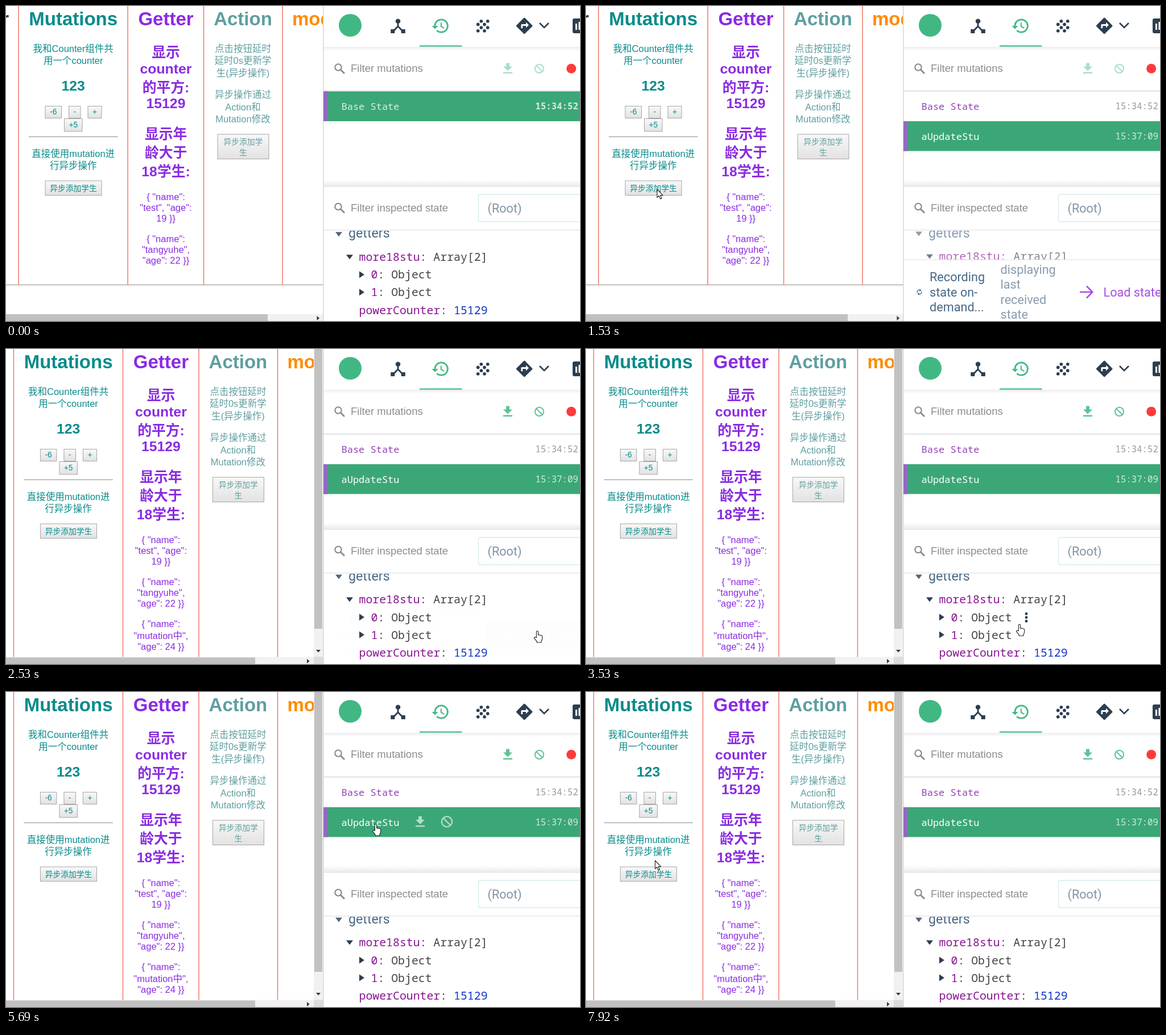
Write an HTML page that moves like this. It is 1009 by 555 pixels and loops after 8 s.

```html
<!DOCTYPE html>
<html lang="zh-CN">
<head>
<meta charset="utf-8">
<title>Store demo</title>
<style>
html, body { margin: 0; width: 100%; height: 100%; overflow: hidden; background: #fff; }
svg { display: block; width: 100vw; height: 100vh; }
text { white-space: pre; }
.page { font: 16.5px "Liberation Sans", "Noto Sans CJK SC", "Noto Sans CJK", sans-serif; text-anchor: middle; }
.page .h1 { font-size: 33px; font-weight: bold; }
.page .h2 { font-size: 24.75px; font-weight: bold; }
.page .btn text { font-size: 13.75px; }
.btn rect { fill: url(#face); stroke: #a6a6a6; }
.btn.down rect { fill: #dcdcdc; stroke: #888; }
.input { font: 18.56px "Liberation Sans", sans-serif; fill: #8c8c8c; }
.ui { font: 21.65px Roboto, sans-serif; }
.mono { font: 19.83px "Noto Sans Mono", monospace; fill: #444; }
.mono .key { fill: #881391; }
.mono .num { fill: #1034cc; }
.log { font: 17px "Noto Sans Mono", monospace; }
.time { font: 500 15.7px "Noto Sans Mono", monospace; }
.ink { fill: #2c3e50; }
.line { fill: none; stroke-width: 2.6; }
</style>
</head>
<body>
<svg viewBox="0 0 1009 555" preserveAspectRatio="none">
  <defs>
    <linearGradient id="face" x2="0" y2="1"><stop stop-color="#f8f8f8"/><stop offset="1" stop-color="#e2e2e2"/></linearGradient>
    <linearGradient id="above" x2="0" y2="1"><stop stop-color="#fff"/><stop offset="1" stop-color="#ececec"/></linearGradient>
    <linearGradient id="below" x2="0" y2="1"><stop stop-color="#ededed"/><stop offset="1" stop-color="#fff"/></linearGradient>
    <clipPath id="pageClip"><rect id="pageBox" width="558" height="543"/></clipPath>
    <clipPath id="treeClip"><rect x="559" y="396" width="450" height="159"/></clipPath>
    <g id="search"><circle cx="-2" cy="-2" r="5.7" fill="none" stroke="#888" stroke-width="2.1"/><path d="M2.5 2.5 9 9" stroke="#888" stroke-width="2.6"/></g>
    <path id="save" d="M-3-9h6v6h5L0 5-8-3h5zM-8 7H8v2.4H-8z"/>
    <g id="block" fill="none" stroke-width="2"><circle r="7.6"/><path d="M-5.4-5.4 5.4 5.4"/></g>
    <path id="open" d="M-6-3.5H6L0 4.5z"/>
    <path id="shut" d="M-4-6 5 0-4 6z"/>
  </defs>
  <rect width="1009" height="555" fill="#fff"/>

  <g clip-path="url(#pageClip)">
    <g id="page" class="page"></g>
  </g>
  <g id="barsShort">
    <rect y="543" width="558" height="12" fill="#f1f1f1"/><rect y="543" width="460" height="12" fill="#c1c1c1"/>
    <path d="M546.5 546v8l4.5-4z" fill="#333"/>
  </g>
  <g id="barsLong">
    <path d="M0 542.5H541V0H557V555H0z" fill="#f1f1f1"/>
    <path d="M0 543.5H438V555H0zM542 0H556V493H542z" fill="#c1c1c1"/>
    <rect x="541" y="542.5" width="16" height="13" fill="#dcdcdc"/>
    <path d="M529 546v8l4.5-4zM545 530h8l-4 4.5z" fill="#333"/>
  </g>

  <rect x="557" width="452" height="555" fill="#fff"/>
  <rect x="557.3" width="1.2" height="555" fill="#ccc"/>
  <rect x="559" y="72" width="450" height="7" fill="url(#below)"/>
  <circle cx="605" cy="34" r="20" fill="#41b883"/>
  <rect x="727" y="69" width="74.5" height="3" fill="#70caa6"/>
  <g class="ink">
    <path transform="translate(672 18.2) scale(1.42)" d="M17 16l-4-4V8.82A3 3 0 1 0 11 8.82V12l-4 4H3v5h5v-3.05l4-4.2 4 4.2V21h5v-5z"/>
    <path transform="translate(747 18.2) scale(1.4)" fill="#42b983" d="M13 3a9 9 0 0 0-9 9H1l3.89 3.89.07.14L9 12H6a7 7 0 1 1 7 7 6.97 6.97 0 0 1-4.94-2.06l-1.42 1.42A9 9 0 1 0 13 3zm-1 5v5l4.28 2.54.72-1.21-3.5-2.08V8z"/>
    <g id="grain" transform="translate(821.2 18.2) scale(1.42)"></g>
    <path transform="translate(894 17.8) scale(1.43)" d="M21.71 11.29l-9-9a1 1 0 0 0-1.42 0l-9 9a1 1 0 0 0 0 1.42l9 9a1 1 0 0 0 1.42 0l9-9a1 1 0 0 0 0-1.42zM14 14.5V12h-4v3H8v-4a1 1 0 0 1 1-1h5V7.5l3.5 3.5z"/>
    <rect x="996" y="22" width="26" height="26" rx="3"/>
    <path d="M1001 31h3v11h-3zM1006.5 28h3v14h-3z" fill="#fff"/>
  </g>
  <path class="line" d="M938 30l8 8 8-8" stroke="#2c3e50"/>

  <use href="#search" x="586" y="110"/>
  <text class="input" x="606" y="116">Filter mutations</text>
  <g id="tools" fill="#42b983" stroke="none">
    <use href="#save" x="882" y="109.5"/><use href="#block" x="937.5" y="110.3" stroke="#42b983"/>
  </g>
  <circle cx="993.7" cy="110.3" r="8.5" fill="#fd3b3b"/>
  <rect x="559" y="148.5" width="450" height="2.5" fill="#e6e6e8"/>
  <g id="active"><rect x="558" width="451" height="52.5" fill="#3ba776"/><rect x="558" width="8" height="52.5" fill="#9468c6"/></g>
  <text id="base" class="log" x="589.5" y="182.5" font-style="italic">Base State</text>
  <text id="baseTime" class="time" x="930.5" y="182">15:34:52</text>
  <g id="update">
    <text class="log" x="589.5" y="235.5" font-weight="bold" fill="#fff">aUpdateStu</text>
    <text class="time" x="930.5" y="235" fill="#d3ecdf" font-weight="bold">15:37:09</text>
  </g>
  <g id="rowTools" fill="#b4dcc9"><use href="#save" x="728" y="228"/><use href="#block" x="775" y="228.5" stroke="#b4dcc9" transform="translate(-155 -45.7) scale(1.2)"/></g>

  <rect x="559" y="306" width="450" height="11" fill="url(#above)"/>
  <rect x="559" y="317" width="450" height="1.5" fill="#e4e4e4"/>
  <use href="#search" x="586" y="355.5"/>
  <text class="input" x="606" y="361.5">Filter inspected state</text>
  <rect x="830.5" y="332" width="190" height="48" rx="3" fill="#fff" stroke="#d3eeeb" stroke-width="1.4"/>
  <text class="ui" x="846.5" y="363.5" fill="#8195a6">(Root)</text>
  <rect x="559" y="394" width="450" height="1.4" fill="#e3e5e8"/>

  <g clip-path="url(#treeClip)">
    <g id="tree" class="mono">
      <use href="#open" x="585" y="401" fill="#586676"/>
      <text class="ui" x="602" y="407.7" fill="#486887" style="font-size:23.2px">getters</text>
      <g class="ink"><use href="#open" x="604" y="441"/><use href="#shut" x="625" y="472.5"/><use href="#shut" x="625" y="503.5"/></g>
      <text x="620.5" y="448"><tspan class="key">more18stu</tspan>: Array[2]</text>
      <text x="641.5" y="479.5"><tspan class="key">0</tspan>: Object</text>
      <text x="641.5" y="510.5"><tspan class="key">1</tspan>: Object</text>
      <text x="620.5" y="542"><tspan class="key">powerCounter</tspan>: <tspan class="num">15129</tspan></text>
    </g>
    <g id="dots" class="ink"><circle cy="-6.5" r="2.4"/><circle r="2.4"/><circle cy="6.5" r="2.4"/></g>
  </g>

  <g id="notice" class="ui">
    <rect x="559" y="447" width="450" height="108" fill="#fff"/>
    <rect x="559" y="446.5" width="450" height="1.2" fill="#e3e5e8"/>
    <path d="M582.3 505a3.7 3.7 0 0 1 5.5-4.2M589.7 503a3.7 3.7 0 0 1-5.5 4.2" fill="none" stroke="#486887" stroke-width="1.3"/>
    <path d="M586.6 498.6l3.2 2.7-3.6 1.6zM585.4 509.4l-3.2-2.7 3.6-1.6z" fill="#486887"/>
    <g id="noticeText"></g>
    <rect id="load" x="845" y="478.5" width="180" height="50" rx="4" fill="#b977f8"/>
    <g id="loadText"><path class="line" d="M868 504H890M880 493.5 890.3 504 880 514.5"/><text x="909.5" y="511.5">Load state</text></g>
  </g>

  <g id="cursor" stroke-linejoin="round" fill="#fff" stroke="#222" stroke-width="1.1">
    <path id="arrow" d="M0 0V14.5l3.3-3.1 2.4 5.6 2.3-1-2.4-5.4h4.6z"/>
    <path id="hand" d="M-1.6 11.5V1.4a1.6 1.6 0 0 1 3.2 0V7q1.2-1 2.6.3 1.3-.8 2.4.5 2.1-.3 2.1 2V13q0 3-1.8 4.5V20H-.9v-1.6L-5.4 12.4q.4-2.4 2.2-1.6z"/>
  </g>
</svg>
<script>
const LOOP = 8000, STEP = LOOP / 104;
const $ = id => document.getElementById(id);
const show = (id, on) => $(id).style.display = on ? '' : 'none';

const lines = (x, fill, rows, cls = '') => rows.map(([y, s]) =>
  `<text class="${cls}" x="${x}" y="${y}" fill="${fill}">${s}</text>`).join('');
const button = (x, y, w, h, fill, rows, id = '') =>
  `<g class="btn" id="${id}"><rect x="${x + .5}" y="${y + .5}" width="${w - 1}" height="${h - 1}"/>${lines(x + w / 2, fill, rows)}</g>`;
const student = (y, name, age) => [[y, '{ "name":'], [y + 19, `"${name}", "age":`], [y + 38, `${age} }}`]];
const wrapped = (y, name, age, gap = 19) => [[y, '{ "name":'], [y + gap, `"${name}",`], [y + gap + 19, `"age": ${age} }}`]];

const cyan = '#088b8b', violet = '#8a2be2', cadet = '#5f9ea0';
const C1 = 118.2, C2 = 281, C3 = 416.5;
$('page').innerHTML =
  [22, 214, 347.5, 486].map(x => `<rect class="rule" x="${x - .7}" width="1.5" height="491" fill="#f0796a"/>`).join('') +
  '<rect id="floor" y="490.8" width="570" height="1.1" fill="#a08d8d"/>' +
  '<text class="h1" x="5" y="33.5" text-anchor="end" style="text-anchor:end" fill="#2c3e50">Counter</text>' +
  lines(C1, cyan, [[33.5, 'Mutations']], 'h1') +
  lines(C1, cyan, [[80.5, '我和Counter组件共'], [102, '用一个counter'], [265.5, '直接使用mutation进'], [287, '行异步操作']]) +
  lines(C1, cyan, [[149.3, '123']], 'h2') +
  button(68.5, 176, 29.5, 22, cyan, [[191, '-6']]) + button(110, 176, 21.5, 22, cyan, [[191, '-']]) +
  button(143.5, 176, 25, 22, cyan, [[191, '+']]) + button(102, 198, 32.5, 23.5, cyan, [[214.3, '+5']]) +
  '<rect x="40" y="229.8" width="156.5" height="1.2" fill="#999"/>' +
  button(68.5, 307.5, 100, 26.5, cyan, [[326, '异步添加学生']], 'add') +
  lines(C2, violet, [[33.5, 'Getter']], 'h1') +
  lines(C2, violet, [[90, '显示'], [118.5, 'counter'], [151.5, '的平方:'], [180, '15129'],
    [234, '显示年'], [267, '龄大于'], [300, '18学生:']], 'h2') +
  lines(C2, violet, [...student(342, 'test', 19), ...wrapped(415.7, 'tangyuhe', 22)]) +
  `<g id="extra">${lines(C2, violet, wrapped(489.5, 'mutation中', 24, 21.3))}</g>` +
  lines(C3, cadet, [[33.5, 'Action']], 'h1') +
  lines(C3, cadet, [[80.5, '点击按钮延时'], [102, '延时0s更新学'], [123.5, '生(异步操作)'],
    [162, '异步操作通过'], [183.5, 'Action和'], [205, 'Mutation修改']]) +
  button(371.5, 225.5, 91, 44.5, cadet, [[244, '异步添加学'], [262.5, '生']]) +
  '<text class="h1" x="503" y="33.5" style="text-anchor:start" fill="#ff8c00">modules</text>';

$('grain').innerHTML = [[10, 6], [18, 6], [6, 10], [14, 10], [10, 14], [18, 14], [6, 18], [14, 18]]
  .map(([x, y]) => `<circle cx="${x}" cy="${y}" r="2"/>`).join('');
const column = (x, y, fill, words) => words.map((s, i) =>
  `<text x="${x}" y="${y + i * 26.5}" fill="${fill}">${s}</text>`).join('');
$('noticeText').innerHTML = column(604, 485, '#486887', ['Recording', 'state on-', 'demand...']) +
  column(728.5, 471.5, '#8a9cae', ['displaying', 'last', 'received', 'state']);

// Pointer route: time, x, y
const route = [
  [220, 700, 518], [380, 480, 400], [610, 200, 260], [840, 110, 300], [990, 125, 323],
  [1770, 125, 323], [1990, 480, 400], [2150, 934, 497], [2850, 934, 497], [3150, 792, 480],
  [3240, 792, 480], [3530, 764, 487.5], [3800, 700, 415], [4070, 650, 435], [4300, 640, 408],
  [4530, 689, 446], [4680, 700, 450], [4930, 700, 450], [5310, 650, 233], [5700, 650, 233],
  [6310, 242, 476], [6700, 280, 520], [7150, 330, 505], [7300, 378, 480], [7700, 180, 330], [7920, 121.5, 297]
];
function pointer(t) {
  const i = route.findIndex(p => p[0] > t);
  if (i < 0) return route.at(-1).slice(1);
  if (i === 0) return null;
  const [a, b] = [route[i - 1], route[i]], k = (t - a[0]) / (b[0] - a[0]);
  return [a[1] + (b[1] - a[1]) * k, a[2] + (b[2] - a[2]) * k];
}

// Inspector rows: top, bottom, menu x, menu y
const menus = [[426, 457, 872, 441], [457, 487, 774, 473], [487, 519, 774, 504], [519, 551, 872, 535]];

function draw(clock) {
  const t = Math.floor((clock % LOOP + 14) / STEP) * STEP;
  const logged = t >= 1530, added = t >= 1995;
  const fade = logged ? Math.max(0, Math.min(1, (2540 - t) / 160)) : 0;
  const at = pointer(t), [x, y] = at || [-50, -50];
  const inPanel = x > 560;

  $('page').setAttribute('transform', `translate(${added ? -8.6 : 0} 0)`);
  $('pageBox').setAttribute('width', added ? 541 : 558);
  document.querySelectorAll('.rule').forEach(r => r.setAttribute('height', added ? 543 : 491));
  show('floor', !added);
  show('extra', added);
  show('barsShort', !added);
  show('barsLong', added);
  $('add').classList.toggle('down', t >= 1070 && t < 1150);

  $('tools').style.opacity = t >= 1610 ? .85 : .45;
  $('active').setAttribute('transform', `translate(0 ${logged ? 203 : 150.5})`);
  $('base').setAttribute('fill', logged ? '#9344b5' : '#d9efe4');
  $('baseTime').setAttribute('fill', logged ? '#999' : '#d3ecdf');
  $('baseTime').setAttribute('font-weight', logged ? 500 : 700);
  $('baseTime').style.fontWeight = logged ? 500 : 700;
  show('update', logged);

  const onRow = logged && inPanel && y > 203 && y < 255;
  show('rowTools', onRow);

  $('tree').setAttribute('transform', `translate(0 ${logged ? 0 : .8})`);
  $('tree').style.opacity = 1 - .35 * fade;
  $('notice').style.opacity = fade;
  const onLoad = fade > 0 && x > 845 && y > 478;
  show('load', onLoad);
  $('loadText').setAttribute('fill', onLoad ? '#fff' : '#a44fe6');
  $('loadText').setAttribute('stroke', 'none');
  $('loadText').firstChild.setAttribute('stroke', onLoad ? '#fff' : '#a44fe6');

  const menu = inPanel && !fade && menus.find(m => y >= m[0] && y < m[1]);
  show('dots', menu);
  if (menu) $('dots').setAttribute('transform', `translate(${menu[2]} ${menu[3]})`);

  const hand = onRow || onLoad || (inPanel && !fade && y > 396);
  show('cursor', at);
  show('hand', hand);
  show('arrow', !hand);
  $('cursor').setAttribute('transform', `translate(${x} ${y})`);
}

const start = performance.now();
function tick() {
  draw(performance.now() - start);
  requestAnimationFrame(tick);
}
tick();
</script>
</body>
</html>
```
